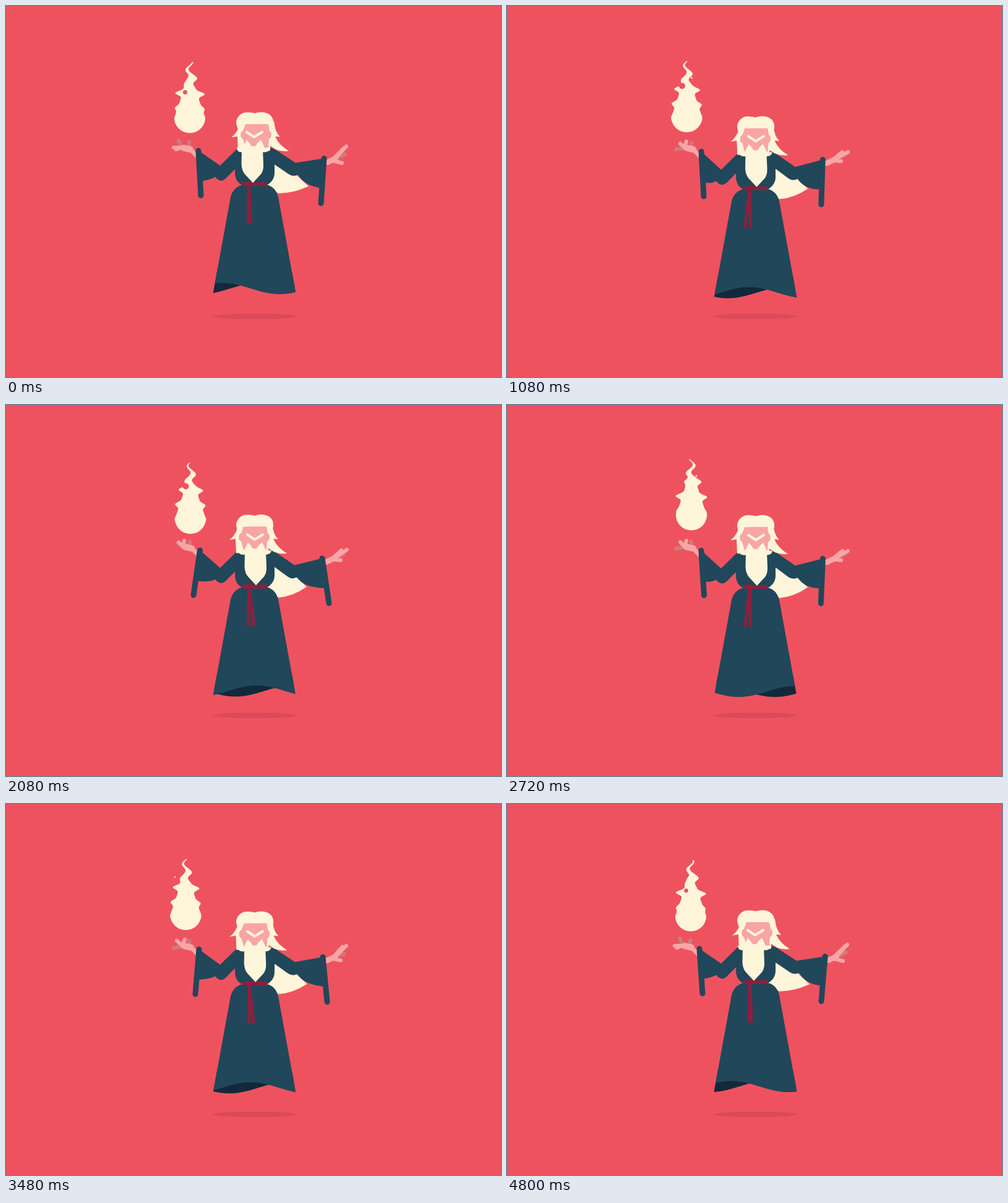
An HTML page with a canvas for the animation above (4.84 s loop, 800 by 600 pixels).

```html
<!DOCTYPE html>
<html lang="en">
<head>
<meta charset="utf-8">
<title>Floating wizard</title>
<style>
html, body { margin: 0; height: 100%; overflow: hidden; background: #ef525f; }
canvas { display: block; }
</style>
</head>
<body>
<canvas id="stage" width="800" height="600"></canvas>
<script>
const ctx = document.getElementById('stage').getContext('2d');
const BG = '#ef525f', CREAM = '#fff5da', ROBE = '#21475a', LINING = '#12293c';
const BELT = '#8d1f3e', SKIN = '#f8a5a6', SHADE = '#cb7d7c', SHADOW = '#d94b58';
const LOOP = 4840, TAU = Math.PI * 2;

// Key phases for the rhythms that share the loop
const BOB = [0, .157, .289, .554, .678];
const DRIFT = [0, .124, .442, .702, .86];
const HEM = [0, .248, .405, .719, .885];
const SWAY = [0, .223, .43, .562, .719, .851];

// Smooth periodic curve through (keys, values)
function curve(keys, values, x) {
  const n = keys.length;
  const key = i => keys[(i + n) % n] + Math.floor(i / n);
  const val = i => values[(i + n) % n];
  const rise = i => (val(i + 1) - val(i)) / (key(i + 1) - key(i));
  const slope = i => {
    const a = key(i) - key(i - 1), b = key(i + 1) - key(i);
    return (b * rise(i - 1) + a * rise(i)) / (a + b);
  };
  let i = n - 1;
  while (keys[i] > x) i--;
  const h = key(i + 1) - key(i), u = (x - key(i)) / h, v = 1 - u;
  return v * v * (1 + 2 * u) * val(i) + u * u * (3 - 2 * u) * val(i + 1)
    + h * u * v * (v * slope(i) - u * slope(i + 1));
}

function fill(color, d) {
  ctx.fillStyle = color;
  ctx.fill(new Path2D(d));
}

function line(color, width, d) {
  ctx.strokeStyle = color;
  ctx.lineWidth = width;
  ctx.stroke(new Path2D(d));
}

function dot(color, x, y, r) {
  ctx.fillStyle = color;
  ctx.beginPath();
  ctx.arc(x, y, Math.max(0, r), 0, TAU);
  ctx.fill();
}

function shifted(x, y, draw) {
  ctx.save();
  ctx.translate(x, y);
  draw();
  ctx.restore();
}

function drawFlame(t) {
  const p = t * 2 % 1, q = .6 + t * 10;
  const cx = curve(DRIFT, [297, 298, 290.5, 296, 298], p);
  const bottom = 205.5 - 3.8 * Math.sin(TAU * p);
  const left = [], right = [];
  for (let h = 0; h <= 115; h++) {
    const wave = Math.cos(TAU * (h / 25 - q));
    const lagged = Math.cos(TAU * ((h + 2) / 25 - q));
    const body = h < 25 ? 25 * Math.sqrt(1 - (1 - h / 25) ** 2)
                        : 1 + 24 * (1 - (h - 25) / 90) ** 1.4;
    const spike = 12 * Math.exp(-(((h - 62) / 22) ** 2));
    const mid = cx + 4.5 * Math.min(1, Math.max(0, (h - 70) / 20)) * wave;
    const y = bottom - h;
    left.push(`${mid - body - spike * ((1 + wave) / 2) ** 3} ${y}`);
    right.unshift(`${mid + body + spike * ((1 + lagged) / 2) ** 3} ${y}`);
  }
  fill(CREAM, 'M' + left.concat(right).join('L') + 'Z');
  const size = (...radii) => curve(SWAY, radii, t);
  dot(BG, cx - 7.5, bottom - curve(SWAY, [66, 75, 77, 76, 70, 66], t), size(3.5, 5, 5, 0, 0, 0));
  dot(CREAM, cx + 8, bottom - 88, size(0, 1.3, 0, 1.3, 0, 0));
  dot(CREAM, cx - 17.5, bottom - 86, size(0, 0, 0, 0, 1.2, 1.2));
}

function drawSkirt(t, d) {
  const p = t * 4 % 1;
  const crest = 535 - 185 * p + curve(HEM, [0, -22, -5, 3, 22], p);
  const hem = phase => {
    let s = '';
    for (let x = 474; x >= 328; x -= 2) s += `L${x} ${457 + 9 * phase(x)}`;
    return s;
  };
  const back = x => Math.cos(TAU * (x - crest + 34) / 185);
  const front = x => -Math.cos(TAU * (x - crest) / 185);
  shifted(0, d, () => {
    ctx.clip(new Path2D('M363 309C366 296 376 289 386 289H418C428 289 437 296 440 309L473 490H330Z'));
    fill(LINING, 'M328 430H474' + hem(back) + 'Z');
    fill(ROBE, 'M328 280H474' + hem(front) + 'Z');
  });
}

function drawArms(p, d) {
  const key = values => curve(BOB, values, p);
  const finger = (color, x, y, xs, ys) => line(color, 6, `M${x} ${y}L${key(xs)} ${key(ys)}`);

  const lx = key([311, 312, 313.5, 315, 314]), ly = key([234, 235, 235, 236, 235.4]);
  const lean = key([4, -6, -10.5, -3, 4.2]);
  const px = lx - 311;
  finger(SHADE, 284 + px, 230, [279, 271, 278, 276, 273], [218, 233, 224, 225, 232]);
  finger(SHADE, 295 + px, 229, [296, 296, 297, 300, 298], [220, 221, 221, 221, 221]);
  finger(SKIN, 284 + px, 229, [271, 276, 279, 275, 280], [229, 221, 222, 231, 222]);
  finger(SKIN, 284 + px, 229, [275, 289, 288, 285, 290], [232, 219, 219, 219, 219]);
  line(SKIN, 10, `M${287 + px} 229.5L${298 + px} 232`);
  line(SKIN, 7, `M${298 + px} 232L${308 + px} 242`);
  fill(ROBE, `M${lx} ${ly}L346 ${258 + d}L373 ${231.5 + d}L382 ${231 + d}L376 ${258 + d}`
    + `L355 ${279 + d}Q347 ${287 + d} 338 ${276.5 + d}Q328 ${282 + d} ${lx + .67 * lean} ${ly + 49}Z`);
  line(ROBE, 9, `M${lx} ${ly}l${lean} 72.5`);

  const rx = key([514, 512, 511, 509, 510.3]), ry = key([246.5, 247.5, 248, 249, 248.5]);
  const swing = key([-5, 7, 11, 4.5, -2.7]);
  const elbow = 468 + (rx - 514) * .6;
  finger(SHADE, 535, 246, [548, 546, 545, 548, 547], [240, 242, 242, 240, 240]);
  finger(SKIN, 533, 246, [550, 550, 551, 551, 551], [227, 229, 234, 236, 236]);
  finger(SKIN, 530, 246, [546, 544, 542, 542, 542], [230, 231, 235, 237, 236]);
  finger(SKIN, 528, 250, [543, 541, 541, 539, 540], [254, 253, 251, 250, 251]);
  line(SKIN, 9, `M${rx + 6} ${ry + 6}L532 247`);
  fill(ROBE, `M${rx} ${ry}L${elbow} ${253.5 + d}L434 ${231.5 + d}L422 ${231 + d}L432 ${255 + d}`
    + `L${elbow - 11} ${272 + d}Q${elbow - 4} ${277 + d} ${elbow + 4} ${273 + d}`
    + `Q482 ${291 + d} ${rx + .66 * swing} ${ry + 48}Z`);
  line(ROBE, 9, `M${rx} ${ry}l${swing} 72.5`);
}

function drawTorso(p) {
  fill(ROBE, 'M372 233Q376 229 384 231H420Q428 228 434 232V270C434 280 428 286 420 291H384C374 286 370 280 370 268Z');
  fill(BELT, 'M382 285H422V291H382Z');
  const tail = xs => line(BELT, 5, `M392.5 288L${curve(BOB, xs, p)} 350.5`);
  tail([391.5, 393, 392, 386, 385]);
  tail([395.5, 400, 401, 396, 393.5]);
  dot(BELT, 392.5, 288, 4.5);
}

function drawHead(sway) {
  const b = 386 - 5 * sway;
  fill(CREAM, `M${b} 232L${b - .5} 256Q${b} 266 ${b + 5} 272L${b + 18} 286L${b + 31} 272`
    + `Q${b + 35.5} 266 ${b + 35} 256L${b + 34} 232Z`);
  // Locks and face swing one way, nose and moustache the other
  shifted(3 * sway, 0, () => {
    fill(CREAM, 'M374 186L373 197Q368 208 361 212.5L371 211L372 234H424V226L433 232Q443 236 454 234.5'
      + 'Q438 225 432 211L440 211.5Q432 205 430 186Z');
    fill(SKIN, 'M384 191H421L423 202C427 203 427 214 422 215L421 229H384L380 215C375 214 375 203 380 202Z');
  });
  fill(CREAM, 'M372 190C372 179 380 171 392 172Q398 172 402 173.5C418 168 434 175 432 191'
    + 'L430 197L421 190Q410 192 402 187Q394 192 383 191L375 200Z');
  shifted(-2 * sway, 0, () => {
    fill(CREAM, 'M375 229Q375 237 384 236.5H419Q428 236 429 230L420 229L414 216.5L408 222'
      + 'Q402 228 396 222L391 216.5L385 229Z');
    dot(SKIN, 402, 221, 6);
  });
  shifted(-sway, 0, () => line(CREAM, 4, 'M390 204L402 212L415 204'));
}

function draw(now) {
  const t = now % LOOP / LOOP;
  const p = t * 3 % 1;
  const d = 4.5 * (1 - Math.cos(TAU * p));
  const sway = curve(SWAY, [1, .1, 0, 0, .15, .85], t);

  ctx.fillStyle = BG;
  ctx.fillRect(0, 0, 800, 600);
  ctx.lineCap = ctx.lineJoin = 'round';
  fill(SHADOW, 'M334 502a67.5 4.5 0 0 1 135 0a67.5 4.5 0 0 1 -135 0Z');

  shifted(0, d, () => fill(CREAM, `M424 240L466 270L${486 + 3 * sway} ${288.5 + 3 * sway}`
    + `Q464 ${304 - sway} 440 ${306 - 3 * sway}L420 290Z`));
  drawArms(p, d);
  drawSkirt(t, d);
  shifted(0, d, () => {
    drawTorso(p);
    drawHead(sway);
  });
  drawFlame(t);
}

function frame() {
  draw(performance.now());
  requestAnimationFrame(frame);
}
frame();
</script>
</body>
</html>
```
